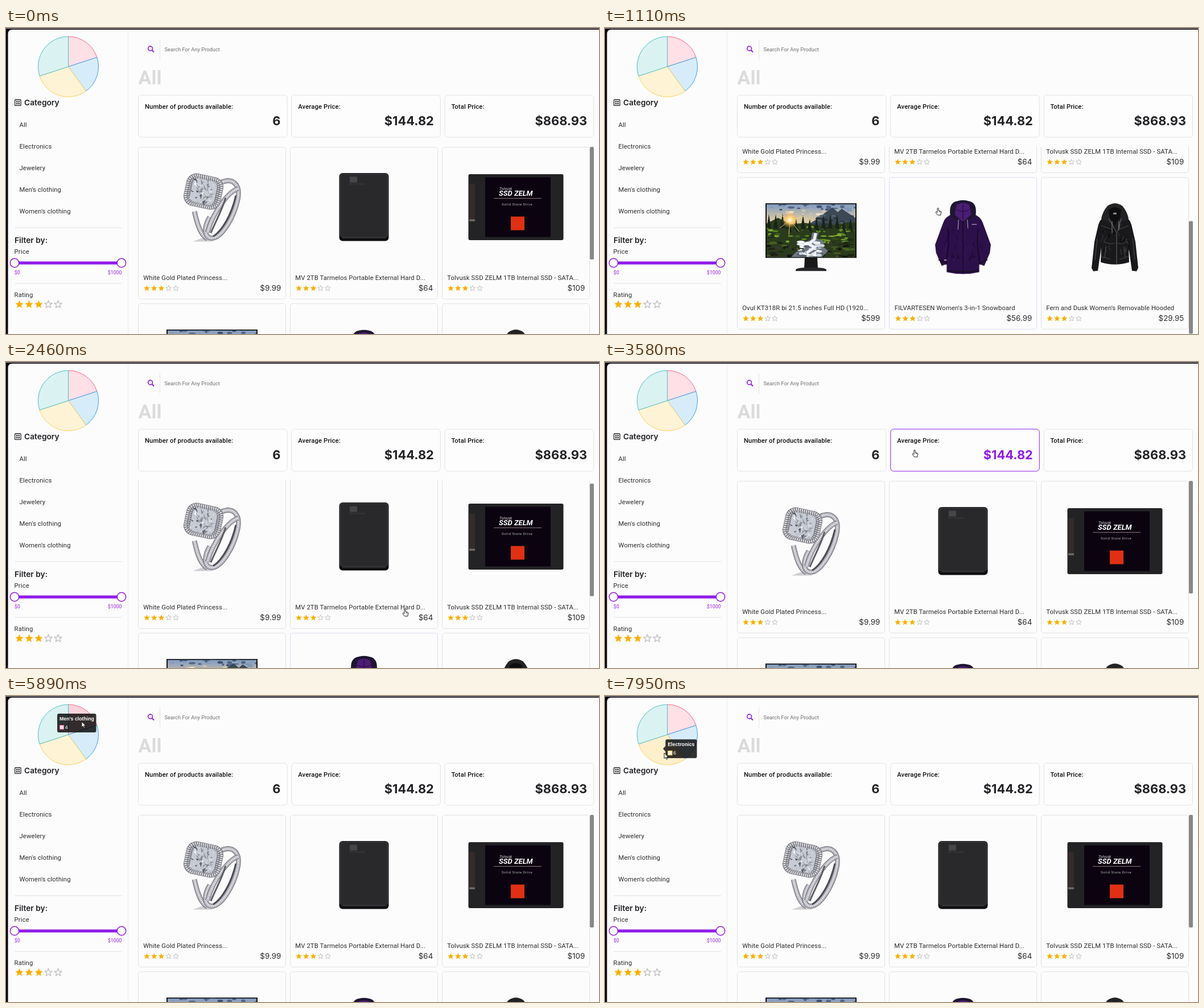
These frames come from a looping animation (1042 px wide and 538 px high, 8 s). An HTML page:

```html
<!DOCTYPE html>
<html lang="en">
<head>
<meta charset="utf-8">
<title>Product dashboard</title>
<style>
  html, body { margin: 0; width: 100%; height: 100%; overflow: hidden; background: #fcfcfc; }
  svg { display: block; width: 100%; height: 100%; }
  text { font: 400 11.3px Roboto, sans-serif; letter-spacing: .11px; fill: #2b2b2e; white-space: pre; }
  .head { font: 600 13.75px Inter, sans-serif; letter-spacing: 0; fill: #1f1f24; }
  .label { font-weight: 500; fill: #111; }
  .big { font: 700 21.8px Inter, sans-serif; letter-spacing: 0; fill: #222226; }
  .price { font: 400 13.4px Inter, sans-serif; letter-spacing: 0; }
  .title { font: 700 34px Roboto, sans-serif; letter-spacing: 0; fill: #dbdbdb; }
  .tip { font: 700 8.75px "Liberation Sans", Arial, sans-serif; letter-spacing: 0; fill: #fff; }
  .tip.n { font-weight: 400; }
</style>
</head>
<body>
<svg id="stage" viewBox="0 0 1042 538" preserveAspectRatio="none" xmlns="http://www.w3.org/2000/svg"></svg>
<script>
const LOOP = 8000, PURPLE = '#911be9', LINE = '#e2e2e4';
const stage = document.getElementById('stage');

// ---------- helpers ----------
const text = (x, y, s, cls = '', more = '') => `<text x="${x}" y="${y}" class="${cls}" ${more}>${s}</text>`;
const rect = (x, y, w, h, fill, more = '') => `<rect x="${x}" y="${y}" width="${w}" height="${h}" fill="${fill}" ${more}/>`;
const path = (d, fill = 'none', more = '') => `<path d="${d}" fill="${fill}" ${more}/>`;
const pen = (d, color, width, more = '') => path(d, 'none', `stroke="${color}" stroke-width="${width}" ${more}`);
const END = 'text-anchor="end"';

let seed = 7;
const rnd = (a, b) => {
  seed = seed * 16807 % 2147483647;
  return +(a + seed / 2147483647 * (b - a)).toFixed(1);
};
const many = (n, make) => Array.from({ length: n }, (_, i) => make(i)).join('');

const STAR = 'M12 17.27 18.18 21l-1.64-7.03L22 9.24l-7.19-.61L12 2 9.19 8.63 2 9.24l5.46 4.73L5.82 21z';
const stars = (x, y, size) => many(5, i =>
  `<g transform="translate(${x + i * size} ${y}) scale(${size / 24})">` +
  (i < 3 ? path(STAR, '#faaf00')
         : `<g transform="translate(12 12) scale(.9) translate(-12 -12)">${pen(STAR, '#b4b4b6', 1.7)}</g>`) + '</g>');

// ---------- product art, centred on 0,0 ----------
function ring() {
  const band = d => pen(d, '#66666e', 8.5) + pen(d, '#b4b4bc', 6.6) +
    pen(d, '#f2f2f5', 2.4, 'stroke-dasharray="1.7 1.5"');
  const gem = many(90, () => {
    const g = Math.round(rnd(70, 250)), p = () => rnd(-6, 6);
    return path(`M${rnd(-18, 18)} ${rnd(-17, 17)}l${p()} ${p()} ${p()} ${p()}z`, `rgb(${g},${g + 4},${g + 10})`);
  });
  return path('M-34 61L-10 52 2 61z', '#cfcfd3') +
    band('M-31 8C-25 35 -19 50 -8 56') +
    band('M16 -43C36 -52 51 -40 45 -12C38 20 17 54 0 55C-14 55 -15 36 -4 18') +
    band('M46 -32C30 -28 2 8 -8 45') +
    pen('M42 -20C34 14 18 42 2 52', '#4d4d55', 3) + pen('M24 -16C16 10 4 30 -2 46', '#5f5f67', 3) +
    `<g transform="translate(-15 -27) rotate(12)">
      ${rect(-33, -29, 66, 58, '#74747c', 'rx="18"')}
      ${rect(-30, -26, 60, 52, 'none', 'rx="16" stroke="#dcdce1" stroke-width="4.5" stroke-dasharray="2.2 1.5"')}
      ${rect(-25, -22, 50, 44, 'none', 'rx="12" stroke="#c0c0c7" stroke-width="3.5" stroke-dasharray="2 1.6"')}
      ${rect(-22, -21, 44, 42, '#c6cbd5', 'rx="10"')}${gem}
    </g>`;
}

const drive = () =>
  rect(-43.5, -59.5, 87, 119.5, '#0f0f11', 'rx="6"') +
  rect(-42.3, -58.5, 84.6, 112, '#3d3d41', 'rx="5"') +
  rect(-40.8, -57.3, 81.6, 110, '#29292c', 'rx="4"') +
  rect(-38, 54, 76, 1, '#4b4b4f') +
  rect(-25, -53, 13, 10, '#46464a') +
  text(-26, -39, 'MV Tarmelos', '', 'style="font-size:4.6px;fill:#434347"');

const ssd = () =>
  rect(-83.5, -57.5, 167, 116, '#232326', 'rx="3"') +
  rect(-82, -40, 10, 66, '#342c2a') + rect(-82, 22, 10, 3, '#75706b') +
  rect(-54, -52, 115, 105, '#0b0410') +
  text(-29, -30, 'Tolvusk', '', 'style="font-size:6.5px;fill:#ddd;font-style:italic"') +
  text(-30, -20, 'SSD ZELM', '', 'style="font:italic 700 13px Roboto,sans-serif;letter-spacing:0;fill:#fff"') +
  rect(-39, -15.5, 84, 1, '#8d7376') +
  text(-25, -3, 'Solid State Drive', '', 'style="font-size:6.2px;letter-spacing:.55px;fill:#b9b9bb"') +
  rect(-9, 17, 24, 24, '#df3014');

function monitor() {
  const blobs = (n, colors, x0, x1, y0, y1) => many(n, i =>
    `<ellipse cx="${rnd(x0, x1)}" cy="${rnd(y0, y1)}" rx="${rnd(2, 7)}" ry="${rnd(.8, 2.6)}" fill="${colors[i % colors.length]}"/>`);
  return rect(-80, -59.5, 160, 96, '#121214') +
    `<g clip-path="url(#screen)">
      ${rect(-78, -58, 156, 93, 'url(#sky)')}
      ${blobs(26, ['#53688a', '#8298b8', '#3f5374'], -78, 78, -58, -47)}
      ${blobs(12, ['#f3e7c8', '#d8c7a8'], -40, 30, -47, -38)}
      ${path('M-12 -18L14 -34 26 -44 38 -52 47 -44 54 -50 78 -34V0H-12z', '#3b4955')}
      ${blobs(22, ['#56636e', '#2a343d'], 14, 76, -38, -22)}
      ${path('M-78 -24L-58 -34 -36 -23 -10 -25 20 -20 78 -26V36H-78z', '#2a3b1c')}
      ${blobs(70, ['#5f8f22', '#3c5a1c', '#1e2a15', '#7fa62f'], -78, 78, -18, 14)}
      ${blobs(70, ['#1f2117', '#39382a', '#48601f', '#15170f'], -78, 78, 10, 36)}
      ${many(14, i => path(`M${-78 + i * 12} -16l4 ${rnd(-26, -10)} 4 26z`, '#18241a'))}
      ${path('M2 -8H14L10 2 24 8 20 16 30 24 18 36H-36L-26 26 -12 20 -16 12 0 4z', '#6f7884')}
      ${blobs(60, ['#eef1f6', '#cfd6e0', '#ffffff', '#59616c'], -24, 20, 6, 34)}
      ${pen('M8 -7L6 4 -4 12 6 18 -8 28', '#eef1f6', 5)}
      ${pen('M-37 -30l-18 14M-37 -30l-2 26M-37 -30l16 20M-37 -30l26 -7M-37 -30l-22 -11M-37 -30l7 -17', '#ffd56e', .9)}
      <circle cx="-37" cy="-30" r="14" fill="url(#sun)"/>
    </g>` +
    path('M-11 36H11L12 55H-12z', '#18181a') + path('M-27 57Q-25 54 -12 53.5H12Q25 54 27 57V59.5H-27z', '#26262a') +
    rect(-4, 33, 8, 1.5, '#77777b');
}

const folds = (n, color, w, y0, y1) => many(n, () =>
  pen(`M${rnd(-w, w)} ${rnd(y0, y1)}q${rnd(-3, 3)} 3 ${rnd(-4, 4)} ${rnd(5, 11)}`, color, 1.1));

const coat = () =>
  path('M-16 -37Q-28 -34 -32 -22L-44.5 12 -43 25 -34 46 -26 43 -26 56Q0 62 26 56L26 43 34 46 43 25 44.5 12 32 -22Q28 -34 16 -37z', '#2c1049') +
  folds(16, '#3b1760', 32, -14, 38) + folds(14, '#1d0b33', 32, -14, 38) +
  pen('M-24 -14L-23 12 -27 44M24 -14L23 12 27 44', '#150924', 1.6) +
  path('M-20 -33Q-24 -56 -8 -58Q0 -60 8 -58Q24 -56 20 -33L0 -22z', '#1f1532') +
  path('M-10 -52Q0 -57 10 -52L13 -36 0 -24 -13 -36z', '#4b1d74') +
  pen('M-10 -44Q0 -38 10 -44M0 -52V-28', '#2a0c44', 1.2) +
  pen('M0 -27V58M-20 30L-10 34M20 30L10 34', '#180a2b', 1.3) +
  pen('M-25 53Q0 58 25 53M-39 36L-28 41M39 36L28 41', '#171024', 2) +
  pen('M-7 -28L-8 -12M7 -28L8 -14', '#b9b0c6', .9) +
  rect(14, -21, 8, 1.3, '#9b8fae') + rect(-30, 36, 4, 1.4, '#c9c1d4');

const leather = () =>
  path('M-14 -37Q-26 -34 -29 -22L-36 8 -41 54 -38 60 -30 59 -24 18 -25 44Q0 52 25 44L24 18 30 59 38 60 41 54 36 8 29 -22Q26 -34 14 -37z', '#19191b') +
  folds(22, '#38383c', 24, -24, 34) + folds(14, '#0b0b0d', 24, -24, 34) +
  path('M-24 -33Q-21 -46 -13 -55Q0 -64 13 -55Q21 -46 24 -33L10 -25H-10z', '#232326') +
  path('M-11 -48Q0 -57 11 -48L9 -33 0 -22 -9 -33z', '#0e0e10') +
  rect(-3, -43, 6, 3, '#8d8d90') +
  pen('M-11 -33L3 -8V47M11 -33L5 -10', '#6b6b70', 1) +
  pen('M-24 -20L-6 -14M24 -20L8 -14M-20 8Q-8 14 0 10M20 8Q10 14 4 10M-24 34L-8 39M24 34L8 39', '#3c3c41', 1.3) +
  pen('M-31 2L-35 40M31 2L35 40M-16 16L-18 36M16 16L18 36', '#404045', 1.4) +
  pen('M-5 -28V-8M7 -28V-12', '#b4b4b8', .7);

const products = [
  ['White Gold Plated Princess...', '$9.99', ring],
  ['MV 2TB Tarmelos Portable External Hard D...', '$64', drive],
  ['Tolvusk SSD ZELM 1TB Internal SSD - SATA...', '$109', ssd],
  ['Ovul KT318R bi 21.5 inches Full HD (1920...', '$599', monitor],
  ["FILVARTESEN Women's 3-in-1 Snowboard", '$56.99', coat],
  ["Fern and Dusk Women's Removable Hooded", '$29.95', leather]
];
const stats = [
  ['Number of products available:', '6'], ['Average Price:', '$144.82'], ['Total Price:', '$868.93']
];

// label, count, start and end angle, fill, hovered fill, stroke, tooltip x, centre y, width, caret tip
const slices = [
  ["Men's clothing", 4, -90, -18, '#ffe0e6', '#ffd3dc', '#ff6384', 90, 47.5, 68.5, 0],
  ['Jewelery', 4, -18, 54, '#d7ecfb', '#cbe6fa', '#36a2eb', 85, 76, 45, 135],
  ['Electronics', 6, 54, 162, '#fff3d6', '#fff0cc', '#ffce56', 106.5, 93, 55, 102],
  ["Women's clothing", 6, 162, 270, '#dbf2f2', '#cfeeee', '#4bc0c0', 77, 52.5, 83, 0]
];
const wedge = (a, b) => {
  const p = d => `${109.5 + 53 * Math.cos(d * Math.PI / 180)} ${68 + 53 * Math.sin(d * Math.PI / 180)}`;
  return `M109.5 68L${p(a)}A53 53 0 0 1 ${p(b)}z`;
};

// ---------- scene ----------
const card = ([name, price, art], i) => {
  const x = 232.5 + i % 3 * 267, y = 209.5 + Math.floor(i / 3) * 275.2;
  return `<g transform="translate(${x} ${y})">
    ${rect(0, 0, 259, 267, '#fcfcfc', `rx="4.5" class="card" stroke="${LINE}"`)}
    <g transform="translate(129.5 105)"><g class="art">${art()}</g></g>
    <g class="info">${text(8.7, 233.2, name)}${stars(8.6, 241.6, 12.75)}</g>
    ${text(250.8, 252.7, price, 'price', END)}
  </g>`;
};

stage.innerHTML = `
  <defs>
    <linearGradient id="sky" x2="0" y2="1"><stop stop-color="#7f9bc2"/><stop offset=".3" stop-color="#dcc9a4"/></linearGradient>
    <radialGradient id="sun"><stop stop-color="#fff"/><stop offset=".3" stop-color="#ffe08a"/><stop offset="1" stop-color="#ff9d2e" stop-opacity="0"/></radialGradient>
    <clipPath id="screen">${rect(-78, -58, 156, 93, '#000')}</clipPath>
    <clipPath id="view">${rect(230, 209, 812, 329, '#000')}</clipPath>
  </defs>
  ${rect(0, 0, 1042, 538, '#09030d')}
  ${rect(0, 0, 1042, 1, '#a4a4a8')}
  ${rect(3.5, 2.8, 1100, 600, '#fcfcfc', 'rx="7"')}
  ${rect(214, 3, 1, 535, '#ebebed')}
  ${slices.map(s => path(wedge(s[2], s[3]), s[4], `class="slice" stroke="${s[6]}"`)).join('')}
  ${rect(15.7, 126, 10.4, 10.4, 'none', 'rx="1" stroke="#24242a" stroke-width="1.3"')}
  ${[18, 21.6].map(x => [128.3, 131.9].map(y => rect(x, y, 2.4, 2.4, '#24242a')).join('')).join('')}
  ${text(32, 136.3, 'Category', 'head')}
  ${['All', 'Electronics', 'Jewelery', "Men's clothing", "Women's clothing"].map((s, i) => text(23.5, 174 + i * 37.9, s)).join('')}
  ${rect(15, 350.5, 189, 1, LINE)}${rect(15, 448.5, 189, 1, LINE)}
  ${text(15, 378, 'Filter by:', 'head')}
  ${text(14.6, 397, 'Price')}
  ${rect(15, 410.5, 188, 5.2, PURPLE)}
  ${[15, 203].map(x => `<circle cx="${x}" cy="413" r="7.7" fill="#fff" stroke="${PURPLE}" stroke-width="1.5"/>`).join('')}
  ${text(15, 433.3, '$0', '', `style="font-size:8.5px;fill:${PURPLE}"`)}
  ${text(203.5, 433.3, '$1000', '', `style="font-size:8.5px;fill:${PURPLE}" ${END}`)}
  ${text(14.6, 473, 'Rating')}
  ${stars(15, 477.3, 17)}
  <circle cx="253.6" cy="36" r="3.9" fill="none" stroke="${PURPLE}" stroke-width="1.6"/>
  ${pen('M256.5 39L260 42.5', PURPLE, 1.9)}
  ${rect(270, 20, 1, 36, '#e4e4e6')}
  ${text(278.4, 41, 'Search For Any Product', '', 'style="font-size:9.3px;letter-spacing:.02px;fill:#6f6f72"')}
  ${text(232.5, 98.7, 'All', 'title')}
  ${stats.map(([label, value], i) => `<g transform="translate(${232.5 + i * 269.3} 118)">
    ${rect(0, 0, 261.5, 74, '#fdfdfd', `rx="5.5" class="stat" stroke="${LINE}"`)}
    ${text(11.4, 24, label, 'label')}${text(250, 53, value, 'big', END)}</g>`).join('')}
  <g clip-path="url(#view)"><g id="list">${products.map(card).join('')}</g></g>
  ${rect(1026, 209, 7, 198, '#888', 'rx="2" id="thumb"')}
  <g id="tip">
    ${path('', '#000', 'id="bubble" fill-opacity=".8"')}
    <g id="tipBody">
      ${text(4, 12.3, '', 'tip', 'id="tipName"')}
      ${rect(4, 20, 8, 8, '#fff')}${rect(4.5, 20.5, 7, 7, '#fff', 'id="swatch"')}
      ${text(13.8, 27.3, '', 'tip n', 'id="tipCount"')}
    </g>
  </g>
  <g id="hand">${path('M-1.6 5.9L-4.6 1.6Q-5.2 .3 -4 0Q-3 0 -2 1.4V-5.4Q-1.9 -6.5 -.9 -6.5Q.1 -6.5 .2 -5.4V-1.8L3.8 -.9Q4.9 -.5 4.8 .8L4 4V6z', '#fff', 'stroke="#222" stroke-width="1"')}${pen('M1.6 -1V1M3.2 -.7V1.2', '#222', .7)}</g>
  <g id="arrow">${path('M0 0V10L2.3 7.9 4 11.5 5.5 10.8 3.9 7.3H7z', '#fff', 'stroke="#111" stroke-width=".9"')}</g>`;

const $ = id => document.getElementById(id);
const all = c => [...stage.querySelectorAll('.' + c)];
const [cards, arts, infos, boxes, values, wedges] = ['card', 'art', 'info', 'stat', 'big', 'slice'].map(all);
const place = (el, x, y) => el.setAttribute('transform', `translate(${x} ${y})`);

// ---------- timing ----------
const steps = [
  0, 150, 290, 430, 560, 690, 810, 960, 1110,
  1920, 2060, 2190, 2320, 2460, 2580,
  2860, 3010, 3150, 3300, 3430, 3580, 3700, 3820,
  3970, 4130, 4280, 4440, 4600, 4760,
  5320, 5460, 5600, 5750, 5890, 6010, 6170, 6320,
  6470, 6600, 6730, 6860, 6990, 7120, 7250,
  7530, 7670, 7810, 7950
];
const scrollKeys = [[0, 0], [560, 0], [690, 20], [810, 78.5], [960, 180], [1110, 222], [1920, 222],
  [2060, 213], [2190, 188.3], [2320, 90], [2460, 8], [2580, 0]];
const mouseKeys = [[0, 598, 560], [150, 594, 520], [560, 586, 323], [1110, 586, 323], [2060, 702, 441],
  [2580, 702, 441], [3010, 690, 330], [3300, 640, 190], [3430, 590, 165], [3580, 545, 161], [3820, 420, 156],
  [4280, 230, 110], [4600, 142, 82], [4760, 135, 80], [5320, 135, 78], [5600, 135, 58], [5890, 133, 45],
  [6320, 128, 44], [6730, 85, 50], [7250, 82, 54], [7670, 92, 82], [7950, 104, 100]];
const hops = [[4600, 1], [5460, 0], [6600, 3], [7670, 2]];

const ramp = (t, a, b) => Math.min(1, Math.max(0, (t - a) / (b - a)));
function at(keys, t) {
  const i = keys.findIndex(k => k[0] > t);
  if (i < 0) return keys[keys.length - 1].slice(1);
  const [a, b] = [keys[i - 1], keys[i]], k = ramp(t, a[0], b[0]);
  return a.slice(1).map((v, j) => v + (b[j + 1] - v) * k);
}

function showTip(t) {
  const n = hops.filter(h => h[0] <= t).length - 1;
  $('tip').style.display = n < 0 ? 'none' : '';
  const active = n < 0 ? -1 : hops[n][1];
  wedges.forEach((w, i) => w.setAttribute('fill', slices[i][i === active ? 5 : 4]));
  if (n < 0) return;
  const k = 1 - (1 - ramp(t, hops[n][0], hops[n][0] + 400)) ** 4;
  const to = slices[active], from = n ? slices[hops[n - 1][1]] : to;
  const [x, y, w] = [7, 8, 9].map(j => from[j] + (to[j] - from[j]) * k);
  const top = y - 16.5, tip = k > .9 ? to[10] : 0, edge = tip < x ? x + .1 : x + w - .1;
  $('bubble').setAttribute('d',
    `M${x + 3} ${top}h${w - 6}q3 0 3 3v27q0 3 -3 3h${6 - w}q-3 0 -3 -3v-27q0 -3 3 -3z` +
    (tip ? `M${edge} ${y - 5}L${tip} ${y}L${edge} ${y + 5}z` : ''));
  $('tip').setAttribute('opacity', n ? 1 : .4 + .6 * k);
  place($('tipBody'), x, top);
  $('tipName').textContent = to[0];
  $('tipCount').textContent = to[1];
  $('swatch').setAttribute('fill', to[4]);
  $('swatch').setAttribute('stroke', to[6]);
}

function draw(now) {
  const t = steps.filter(s => s <= now).pop();
  const [scroll] = at(scrollKeys, t), [mx, my] = at(mouseKeys, t);
  place($('list'), 0, -scroll);
  $('thumb').setAttribute('y', 209 + scroll * .588);

  const toCoat = ramp(t, 960, 1110), toDrive = ramp(t, 2460, 2580);
  const hover = [0, ramp(t, 290, 560) - toCoat + toDrive - ramp(t, 3150, 3430), 0, 0, toCoat - toDrive, 0];
  cards.forEach((c, i) => {
    c.setAttribute('stroke', hover[i] > .5 ? '#e0d8f6' : LINE);
    arts[i].setAttribute('transform', `scale(${1 + hover[i] * .1})`);
    place(infos[i], hover[i] * .6, 0);
  });

  const inStats = my > 118 && my < 192;
  boxes.forEach((b, i) => {
    const left = 232.5 + i * 269.3, on = inStats && mx > left && mx < left + 261.5;
    b.setAttribute('stroke', on ? PURPLE : LINE);
    values[i].style.fill = on ? PURPLE : '';
  });

  showTip(t);
  const pointing = mx > 232 && my > 118;
  $('hand').style.display = pointing ? '' : 'none';
  $('arrow').style.display = pointing ? 'none' : '';
  place($(pointing ? 'hand' : 'arrow'), mx, my);
}

const start = performance.now();
function tick() {
  draw((performance.now() - start) % LOOP);
  requestAnimationFrame(tick);
}
tick();
</script>
</body>
</html>
```
